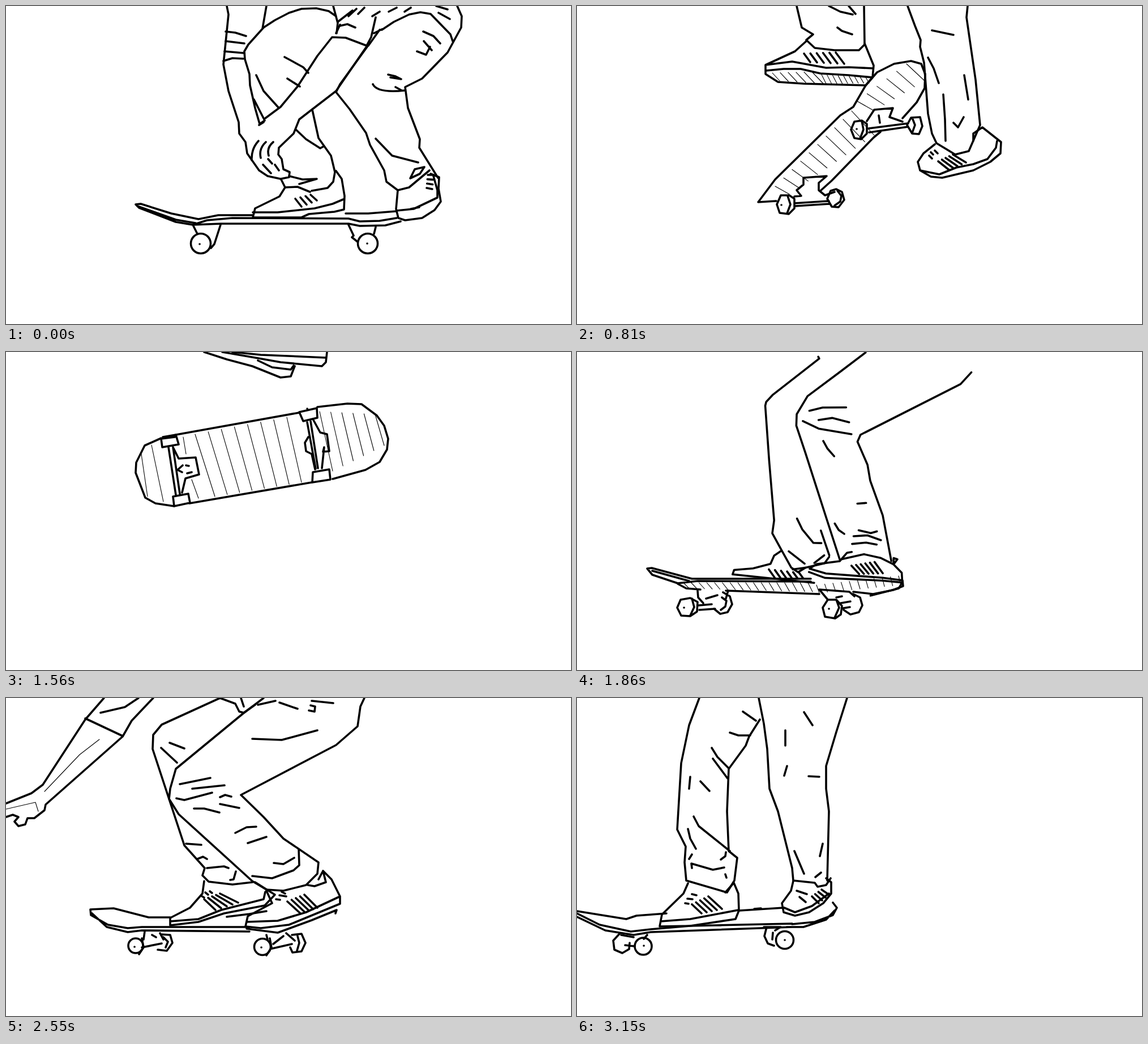
Animation of 998x561 px, one loop 3.18 s. Source, as an HTML page:

```html
<!DOCTYPE html>
<html lang="en">
<head>
<meta charset="utf-8">
<title>Skateboard flip</title>
<style>
html, body { margin: 0; width: 100%; height: 100%; overflow: hidden; background: #fff; }
svg { display: block; width: 998px; height: 561px; }
path, circle {
  fill: none; stroke: #000; stroke-width: 3.6px; vector-effect: non-scaling-stroke;
  stroke-linecap: round; stroke-linejoin: round;
}
.fine { stroke-width: 1.1px; }
.pose { display: none; }
</style>
</head>
<body>
<!-- data-joints: nose and tail, foot and knee, or shoulder and hand -->
<!-- data-rule: n lines between two edges -->
<svg viewBox="0 0 998 561">
<g class="pose" data-t="0" data-end="300">
  <g class="board" data-joints="229 351 750 370">
    <path d="M600 366H640L690 362M436 369H375L340 376 292 366 238 349 229 350 235 356 300 381 330 386 355 378 400 374 605 375 625 380 660 379 690 374M330 386 380 384H605L625 388 670 387 697 380M232 353 300 377 335 383"/>
    <g class="under">
      <circle cx="344" cy="419" r="17.5"/><path d="M342 420h.1"/>
      <circle cx="639" cy="419" r="17.5"/><path d="M638 419h.1"/>
      <path d="M331 388 338 402M379 386 368 420 362 427M605 386 614 405 611 408 621 416M653 390 650 402"/>
    </g>
  </g>
  <g class="front" data-joints="520 350 435 70">
    <path d="M460 0 453 40M421 80 428 68 455 38 475 25 500 12 522 5 548 4 570 9 583 18M578 0 586 30 584 48M421 80 422 94 430 120 431 140 440 180 448 208 457 202 438 165M442 122 455 150 482 180"/>
    <path d="M492 90 525 108 534 118M497 128 519 142M541 183 552 233 574 264 581 293 578 310 568 321 540 326M512 218 530 235 555 251 562 247"/>
    <path d="M500 300 524 306 549 305 518 314M486 306 493 320 515 319 537 328M493 320 483 336 440 357 436 373H522L535 367 580 363 597 359 598 335 593 305 583 291M436 364H480L545 357 577 349 596 341"/>
    <path data-rule="511 340 538 333 522 354 549 343 4"/>
  </g>
  <g class="back" data-joints="730 345 730 70">
    <path d="M664 42 685 28 712 15 732 11 750 14 785 50 789 62M797 0 805 18 804 38 780 82 735 128 705 143 710 180 731 235 730 250 763 303M764 12 784 23M760 0 780 6"/>
    <path d="M737 45 755 53 767 66M738 62 752 78M726 80 742 86 749 72M675 121 688 124 698 129 679 126M648 138Q656 154 704 149M688 143 699 149"/>
    <path d="M638 72 590 138 583 152 607 182 636 224 643 245 668 290 672 310 692 325 712 320 748 290M653 234 682 264 728 276M714 304 722 288 739 284 731 296Z"/>
    <path d="M692 325 689 358 693 374 705 378 735 374 757 360 768 345 764 322 765 302 750 296M690 361 720 358 762 338 762 325 755 300M715 358 730 355"/>
    <path data-rule="745 298 743 321 755 298 753 323 4"/>
  </g>
  <g class="arm" data-joints="600 -150 480 280">
    <path d="M390 0 393 15 384 103 393 150 411 205 412 225 423 240 426 260 447 290 462 300 485 305 500 302 501 293 490 288 487 270 481 262 482 250 508 225 518 200 540 183 583 150 638 70"/>
    <path d="M388 45 405 47 424 53M388 62 421 66M386 80 420 83M384 97 400 92 419 93M446 238Q433 252 434 272M459 240Q446 252 450 268M472 240Q460 250 464 264M454 280 468 295M463 270 470 278M475 280 482 290"/>
    <path d="M455 205 447 210M458 198 485 178 515 142 550 88 576 55 600 56 637 70 645 55 653 20M590 33 583 48M586 28 612 8M590 35 603 32 617 38M605 18 619 5M622 14 633 3M647 18 660 10M640 70 660 42M650 48 664 41M676 10 690 3M704 10 715 3"/>
  </g>
</g>

<g class="pose" data-t="450">
  <g class="board" data-joints="186 330 720 398"></g>
  <g class="front" data-joints="462 352 415 60"></g>
  <g class="back" data-joints="690 378 700 75"></g>
  <g class="arm" data-joints="520 -420 410 -170"></g>
</g>

<g class="pose" data-t="570" data-end="690">
  <g class="board" data-joints="203 323 715 397">
    <path d="M405 354 350 350 300 351 208 321 202 323 210 332 280 361 400 366 575 386 600 396 650 393M215 330 260 354 300 366 400 374 565 391 610 404 650 405 710 398M600 399 650 400 710 396M440 360 520 366 590 380 650 381"/>
    <g class="under">
      <circle cx="322" cy="403" r="18"/><path d="M322 403h.1"/>
      <circle cx="598" cy="428" r="18"/><path d="M596 427h.1"/>
      <path d="M306 372 312 386M349 374 332 388M303 373 290 382 292 398 305 404M558 396 568 410 583 414M570 398 586 412M563 406 561 425 570 436 578 438M590 402V410M604 402 602 410"/>
    </g>
  </g>
  <g class="front" data-joints="470 345 415 55">
    <path d="M424 0 413 25 408 55 414 90 427 135 430 185 450 232M431 143 445 160 453 185 454 215 448 248 434 265 433 285M544 0 538 25 512 69 507 100 505 228M523 0 515 12M434 41 452 55 484 88M470 67 483 75 496 80M425 66 437 65 455 82 475 112 495 117M437 89 445 105 457 139M464 134 472 165 495 230 510 236M511 230 518 280"/>
    <path d="M518 280 500 290 470 286 440 291M438 293 485 302 510 294 519 285M438 293 430 325 420 342 404 352 403 366 440 367 536 331 535 315 523 284 517 277M403 358 435 352 500 324 532 317"/>
    <path data-rule="456 321 495 304 469 334 505 313 6"/>
  </g>
  <g class="back" data-joints="682 375 680 80">
    <path d="M588 0 577 80 575 110 587 155 624 257 619 295 625 325 640 345 665 347 690 335 697 325M690 0 678 55 682 80 673 110 676 130 685 158 684 250 700 335M598 0 601 5M613 57 602 68M626 69 605 87M649 69 628 86M584 93 605 105M627 107 645 112 668 97M641 124 655 128 668 122M607 147 601 157M642 148 668 160M618 182 623 230M636 191 648 212M639 247 648 268 672 298 679 302M638 327 665 325 687 317"/>
    <path d="M700 335 712 355 715 373M649 346 651 380 655 393 670 398 695 397 712 388 716 374M651 383 690 389 705 385 714 376"/>
    <path data-rule="694 335 697 347 700 336 704 348 3"/>
  </g>
</g>

<g class="pose" data-t="810" data-end="1140">
  <g class="board" data-joints="320 346 606 100">
    <path d="M352 344 320 346 350 306 465 193 488 178 510 140 530 117 560 102 590 97 608 102 615 120 614 145 600 170 575 198M536 222 524 232 450 308 430 326"/>
    <g class="under">
      <path d="M512 203 525 183 558 180 552 196 575 204M533 193 535 206M515 216 585 207M516 223 585 213M490 204 484 218 490 233 502 235 512 225 512 208 503 202ZM503 203 506 218 500 234M494 217h.1M590 197 583 210 592 225 604 226 610 212 606 196ZM592 197 597 210 592 224"/>
      <path d="M384 336 396 335 388 325 400 315 400 303 441 300 427 312 427 325 438 334 455 328M384 348 445 344M385 353 446 349M360 334 353 350 358 365 374 367 384 357 384 340 375 334ZM372 335 377 350 371 366M361 351h.1M448 326 442 340 450 354 462 355 472 342 468 328 458 323ZM460 326 467 335 465 345 455 352"/>
      <path class="fine" data-rule="350 318 485 185 375 332 525 228 10"/>
      <path class="fine" data-rule="495 168 582 102 525 185 614 132 6"/>
    </g>
  </g>
  <g class="front" data-joints="430 105 430 -190">
    <path d="M388 0 397 38 417 50 405 60 420 74 455 78H498L508 68 507 0M445 0 465 10 487 15M480 0 492 14M460 38 468 44 486 50"/>
    <path d="M405 62 385 80 333 104V120L355 134 400 137 510 140 522 126 524 105 508 66M333 104 380 98 440 109 480 108 523 110M334 114 365 111 395 111 430 119 480 122 522 126"/>
    <path data-rule="401 84 457 82 412 99 472 102 6"/>
    <path class="fine" data-rule="345 118 415 116 358 132 435 137 6"/>
    <path class="fine" data-rule="432 121 510 126 440 137 516 136 9"/>
  </g>
  <g class="back" data-joints="678 265 650 -40">
    <path d="M584 0 597 35 607 60 606 72 613 100 620 190 627 225 635 242 668 262 692 256 712 210 704 130 688 20 690 0M627 43 665 51M620 91 630 110 639 136M684 122 691 165M647 156 650 200 651 238M665 206 673 214 683 196"/>
    <path d="M632 244 612 260 602 275 606 290 625 301 645 303 700 290 730 275 748 260 749 240 716 214 700 225V238M606 290 640 297 670 285 700 279 725 270 740 250 742 238M632 255 637 260M622 264 627 269M625 258 629 262"/>
    <path data-rule="638 274 664 262 657 289 687 276 5"/>
  </g>
</g>

<g class="pose" data-t="1110">
  <g class="board" data-joints="230 300 670 180"></g>
  <g class="front" data-joints="425 42 425 -250"></g>
  <g class="back" data-joints="635 145 620 -170"></g>
</g>

<g class="pose" data-t="1560" data-end="1740">
  <g class="board" data-joints="229 215 675 150">
    <path d="M274 152 245 165 230 195 229 213 246 257 264 267 297 272M324 267 540 230M577 224 635 208 660 194 673 172 675 153 668 130 655 112 628 92 603 91 550 97M300 146 518 107"/>
    <g class="under">
      <path d="M277 150 300 146 305 163 276 168 274 153 298 150M287 168 300 252M295 168 307 250M295 168 305 188 335 186 341 216 317 223 311 248M295 255 322 250 325 266 297 272ZM312 200 303 208 311 212M318 200 323 201M320 214 328 212"/>
      <path d="M518 106 549 99 550 116 525 122ZM532 100h.1M532 124 547 206M538 122 551 205M534 150 528 160 530 175 540 180 546 207M543 120 555 142 567 145 571 175 560 176 562 168 558 205M542 212 571 207 573 225 541 230Z"/>
      <path class="fine" d="M239 180 250 255M257 164 278 264M313 150 318 180M328 225 340 258"/>
      <path class="fine" data-rule="334 145 496 115 369 255 522 230 8"/>
      <path class="fine" data-rule="554 105 652 110 577 210 668 165 6"/>
    </g>
  </g>
  <g class="front" data-joints="430 10 430 -280">
    <path d="M350 0 390 13 435 25 485 45 503 43 510 25M445 15 470 27 503 31 508 24"/>
  </g>
  <g class="back" data-joints="475 10 520 -290">
    <path d="M382 0 440 10 485 18 558 25 565 18 567 0M400 0 450 5 520 8 564 10"/>
  </g>
</g>

<g class="pose" data-t="1860">
  <g class="board" data-joints="125 383 576 408"></g>
  <g class="front" data-joints="355 393 335 90"></g>
  <g class="back" data-joints="495 393 390 105"></g>
</g>

<g class="pose" data-t="2130" data-end="2340">
  <g class="board" data-joints="147 380 598 405">
    <path d="M435 397H225L154 378 146 379 155 390 200 405 235 401 435 402M155 383 220 401M200 406 215 414 240 416M285 418 450 424M510 420 545 424 580 417 598 410 597 400"/>
    <g class="under">
      <path d="M235 418 236 430 245 440M289 418 285 432M237 444 260 442M238 452 266 450M250 432 270 426M205 434 199 448 206 462 222 463 234 455 235 438 222 431ZM225 432 229 447 222 462M211 448h.1M280 421 292 428 296 442 288 456 275 459 264 450M278 430 286 436 284 446 276 452"/>
      <path d="M465 434 450 416 503 420 512 428M480 430 490 428M488 440 505 437M492 449 504 447M465 434 456 448 460 464 478 467 488 460 490 445 480 434ZM480 434 485 448 477 466M467 450h.1M510 424 522 430 526 444 520 456 505 460 493 452"/>
      <path class="fine" data-rule="210 404 430 404 220 414 438 420 17"/>
      <path class="fine" data-rule="445 408 590 392 450 422 594 408 11"/>
    </g>
  </g>
  <g class="front" data-joints="375 390 326 90">
    <path d="M409 0 411 3 335 75 325 88 324 95 340 190 359 295 358 318 377 346 397 375 410 382 422 373 455 362 462 350M399 288 410 306 432 328 446 327M390 347 420 366M443 305 462 347M437 363 453 348"/>
    <path d="M376 348 365 357 360 372 330 383 297 389 295 397 440 398M400 378 422 373"/>
    <path data-rule="358 382 412 383 370 396 420 392 6"/>
  </g>
  <g class="back" data-joints="515 390 358 125">
    <path d="M457 0 418 43 370 95 357 130 360 150 385 195 443 302 480 370M648 0 633 24 475 145 472 158 497 195 507 222 540 278 570 355M378 120 400 110 441 102M397 133 420 125 451 127M370 140 400 148 459 147M412 168 422 180 436 191M492 266 507 262M459 308 468 318 479 323M503 312 525 313 535 308M496 324 520 318 545 322M496 338 520 331 539 331"/>
    <path d="M430 395 440 385 480 372 490 355 498 352M483 368 520 352 550 353 575 360 580 350 573 349 575 360 592 372 596 388 592 400 545 422M430 395 460 398 560 387 595 385M430 401 460 406 560 392 594 389"/>
    <path data-rule="502 376 541 362 518 388 559 379 6"/>
  </g>
  <g class="arm" data-joints="300 -400 60 -120"></g>
</g>

<g class="pose" data-t="2550" data-end="2850">
  <g class="board" data-joints="149 375 584 390">
    <path d="M290 387H252L190 371 149 373 150 383 180 400 215 406 240 404H430M152 380 178 404 215 413 240 410 430 412M390 386 430 381 460 376M425 407 480 414 540 392 584 374 582 380"/>
    <g class="under">
      <circle cx="229" cy="437" r="13"/><path d="M227 439h.1"/>
      <circle cx="453" cy="439" r="14.5"/><path d="M451 440h.1"/>
      <path d="M240 424 243 440 235 452M245 412 243 426M272 415 278 426M240 440 275 433M258 418 265 422M275 417 290 418 294 432 284 446 268 444M278 422 286 430 282 440"/>
      <path d="M466 424 469 440 460 454M460 418 462 426M495 415 510 428M470 442 505 434M472 434 490 420M505 418 522 416 529 432 522 447 506 449 502 440M515 420 518 432 514 446"/>
    </g>
  </g>
  <g class="front" data-joints="375 385 260 75">
    <path d="M378 0 275 47 260 65 259 90 315 260 351 300 347 313 358 324 400 329 435 325M378 0 405 10 412 24 420 26 440 12M415 0 420 15M274 88 302 114M289 79 315 89M318 257 345 259M338 284 348 280 355 284M355 300 385 297 393 300M406 306 402 320 396 321"/>
    <path d="M350 323 347 345 325 370 290 388V401L340 395 385 380 457 366 475 347 440 325M290 394 340 390 380 374 455 355 458 342M352 343 357 347M345 349 350 352M360 341 364 344"/>
    <path data-rule="350 355 378 345 370 374 410 361 5"/>
  </g>
  <g class="back" data-joints="510 380 290 165">
    <path d="M455 0 418 28 300 125 290 160 288 178 305 205 435 323 460 338 490 340 530 330 550 310 552 290 490 248 455 210 415 171 583 83 621 50 626 15 633 0M517 266 518 295 508 304 470 318 435 314"/>
    <path d="M435 72 487 74 550 57M307 152 361 141M329 160 386 154M301 177 315 180 364 167M332 195 350 195 377 202M378 175 387 171 398 174M378 187 412 194M405 238 425 228 442 227M427 256 460 245M473 291 490 293 509 282M483 8 515 19M540 5 578 9M538 13 546 15 545 24 535 22M445 12 476 5"/>
    <path d="M460 340 470 362 427 385 423 403 450 406 500 400 590 363V350L575 320 560 305 565 325 545 332 533 330M425 395 480 393 530 378 590 350M560 305 552 320M477 355 484 356M483 348 495 350M487 342 493 345"/>
    <path data-rule="497 359 527 347 520 380 550 370 5"/>
  </g>
  <g class="arm" data-joints="260 -80 30 205">
    <path d="M173 0 140 38 65 153 45 168 0 186M140 36 206 67M260 0 222 40 206 68 70 188 68 198 50 212 38 212 34 223 22 226 15 218 22 210 12 206 0 210M167 26 210 16 234 0"/>
    <path class="fine" d="M165 73 130 100 68 165M0 196 52 184 57 200"/>
  </g>
</g>

<g class="pose" data-t="3150" data-end="3180">
  <g class="board" data-joints="-50 365 459 370">
    <path d="M0 376 87 390 105 384 158 380M0 380 40 400 95 412 130 408 200 402 380 398M0 386 50 410 100 418 130 413 380 404M287 375 365 370M452 361 459 370 452 383 420 395 380 399M455 375 440 391 400 404H370M313 372 325 371"/>
    <g class="under">
      <circle cx="117" cy="438" r="15"/><path d="M118 437h.1"/>
      <circle cx="367" cy="427" r="15.5"/><path d="M367 427h.1"/>
      <path d="M124 418 118 425M75 416 64 428 66 444 80 450 92 443 93 432M78 418 100 422M85 436 102 438M335 404 331 420 337 433 348 437M330 404H360M350 410 358 405M346 414 345 426"/>
    </g>
  </g>
  <g class="front" data-joints="215 380 185 110">
    <path d="M216 0 198 48 184 115 177 232 192 262 190 290 193 322 265 343 278 322 283 282 268 270 265 200 268 125 298 84 304 68 323 38M293 24 316 40M270 61 285 66 306 66M238 88 248 104 268 124M240 107 266 142M200 139 198 160M218 147 234 164M206 209 215 226 270 270M196 231 200 248 210 266M203 276 198 284M203 300 202 292 240 303 260 299M254 285 262 279 263 272M262 311 264 317"/>
    <path d="M196 327 188 345 150 382 146 403 200 402 280 390 286 375 285 345 277 326 262 343M148 394 200 390 285 374M191 362 197 363M195 354 204 355M203 346 211 348"/>
    <path data-rule="203 364 232 350 220 380 256 372 5"/>
  </g>
  <g class="back" data-joints="405 360 400 80">
    <path d="M321 0 330 45 336 90 340 160 355 200 380 300 382 322M477 0 458 60 440 120V160L445 200 442 322M401 25 416 48M368 57V84M371 120 366 137M409 138 428 139M384 270 401 310M434 257 429 279M431 308 421 316M382 322 420 326 425 333 440 330 448 318"/>
    <path d="M382 323 378 340 362 362 365 378 385 384 410 378 435 362 449 345V325L440 318M366 370 385 378 415 367 445 345M388 340 406 346M393 351 404 360"/>
    <path data-rule="415 350 432 338 427 362 445 347 4"/>
  </g>
</g>
</svg>
<script>
const STEP = 30, LOOP = 3180, SPIN_START = 810, SPIN_END = 1560;
const all = (q, root = document) => [...root.querySelectorAll(q)];
const nums = s => s.split(' ').map(Number);
const mix = (a, b, k) => a + (b - a) * k;

for (const el of all('[data-rule]')) {
  const [ax, ay, bx, by, cx, cy, dx, dy, n] = nums(el.dataset.rule);
  let d = '';
  for (let i = 0; i < n; i++) {
    const k = i / (n - 1);
    d += `M${mix(ax, bx, k)} ${mix(ay, by, k)}L${mix(cx, dx, k)} ${mix(cy, dy, k)}`;
  }
  el.setAttribute('d', d);
}

const poses = all('.pose').map(el => ({ el, t: +el.dataset.t, end: +el.dataset.end || 0 }));
const tracks = {};
for (const pose of poses) {
  pose.parts = all('[data-joints]', pose.el).map(el => {
    const name = el.getAttribute('class'), joints = nums(el.dataset.joints);
    (tracks[name] ||= []).push({ t: pose.t, joints });
    return { el, name, joints, under: el.querySelector('.under') };
  });
}

function jointsAt(track, t) {
  const i = track.findIndex(k => k.t >= t);
  if (i < 1) return track.at(i).joints;
  const a = track[i - 1], b = track[i], k = (t - a.t) / (b.t - a.t);
  return a.joints.map((v, j) => mix(v, b.joints[j], k));
}

// Carries one joint pair onto another; flip narrows across the pair's axis.
function carry([ax, ay, bx, by], [cx, cy, dx, dy], flip) {
  const turn = (x, y) => Math.atan2(y, x) * 180 / Math.PI;
  const s = Math.hypot(dx - cx, dy - cy) / Math.hypot(bx - ax, by - ay);
  return `translate(${cx} ${cy}) rotate(${turn(dx - cx, dy - cy)}) scale(${s} ${s * flip})`
    + ` rotate(${-turn(bx - ax, by - ay)}) translate(${-ax} ${-ay})`;
}

function draw(t) {
  const now = poses.find(p => t < p.end);
  const k = (t - SPIN_START) / (SPIN_END - SPIN_START);
  const spin = k > 0 && k < 1 ? Math.cos(2 * Math.PI * k) : 1;
  for (const p of poses) p.el.style.display = p === now ? 'inline' : 'none';
  for (const { el, name, joints, under } of now.parts) {
    const flip = name === 'board' ? Math.max(0.03, Math.abs(spin)) : 1;
    el.setAttribute('transform', carry(joints, jointsAt(tracks[name], t), flip));
    if (under) under.style.display = spin < 0 ? 'none' : 'inline';
  }
}

const start = performance.now();
function tick() {
  const t = (performance.now() - start) % LOOP;
  draw(Math.floor(t / STEP) * STEP);
  requestAnimationFrame(tick);
}
tick();
</script>
</body>
</html>
```
